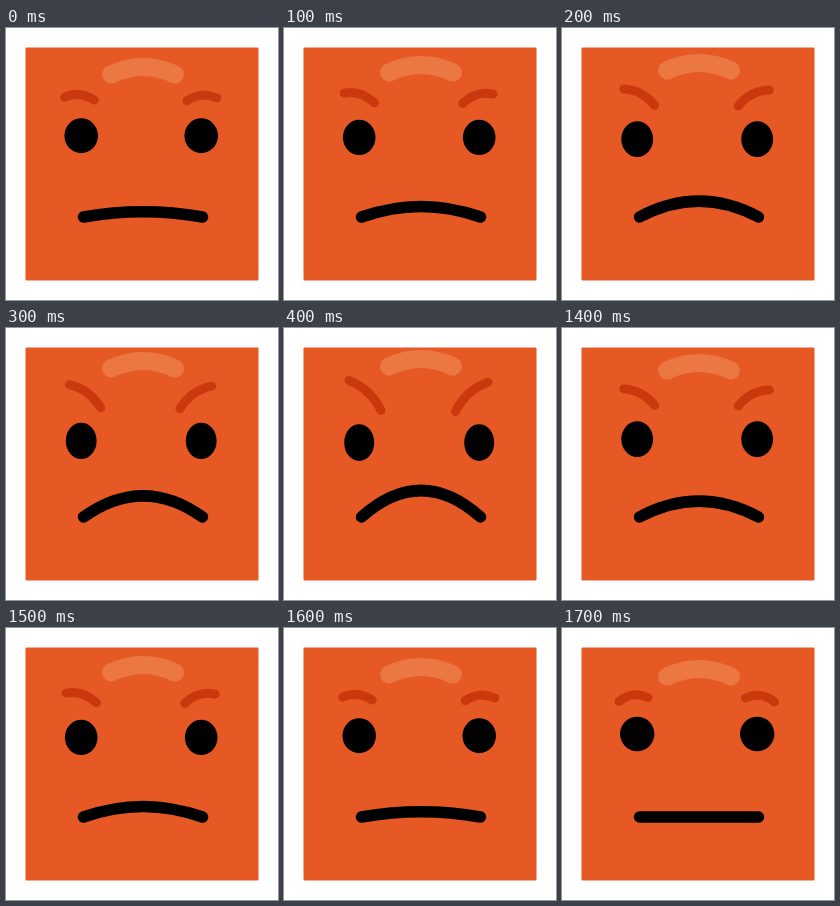
Recreate the animation shown at these times as an HTML page. Size 272x272 px, loop 1900 ms.

```html
<!DOCTYPE html>
<html lang="en">
<head>
<meta charset="utf-8">
<title>Angry square</title>
<style>
  html, body { margin: 0; width: 100%; height: 100%; overflow: hidden; background: #fff; }
  svg { display: block; width: 100vw; height: 100vh; }
  path {
    d: var(--calm);
    fill: none;
    stroke-linecap: round;
    animation: frown 1.9s infinite;
  }
  /* Five hard steps into the frown, a hold, five steps back out. */
  @keyframes frown {
    0% { d: var(--calm); animation-timing-function: steps(5, start); }
    26.31% { d: var(--angry); animation-timing-function: linear; }
    68.42% { d: var(--angry); animation-timing-function: steps(5, start); }
    94.73%, 100% { d: var(--calm); }
  }
  .shine {
    stroke: #eb7743; stroke-width: 18;
    --calm: path("M105 48.5Q137 33.5 169 48.5");
    --angry: path("M105 38.5Q137 23.5 169 38.5");
  }
  .brow { stroke: #c9390d; stroke-width: 9; }
  .brow.left {
    --calm: path("M57 73.5Q70 62.5 86 69.5");
    --angry: path("M65 52.5Q86.5 61 97 82.5");
  }
  .brow.right {
    --calm: path("M212.5 74Q199.5 63 183.5 70");
    --angry: path("M204 54.2Q182 62 171.5 83.5");
  }
  .eye {
    fill: #000;
    --calm: path("M58 106a17.2 17.2 0 1 0 34.4 0a17.2 17.2 0 1 0 -34.4 0z");
    --angry: path("M60.2 114.6a15 18.4 0 1 0 30 0a15 18.4 0 1 0 -30 0z");
  }
  .mouth {
    stroke: #000; stroke-width: 11.5;
    --calm: path("M77.5 189Q137 189 196.5 189");
    --angry: path("M77.5 189Q137 136 196.5 189");
  }
</style>
</head>
<body>
<svg viewBox="0 0 272 272">
  <rect x="19.5" y="19.5" width="233" height="233" rx="1" fill="#e65925"/>
  <path class="shine"/>
  <path class="brow left"/>
  <path class="brow right"/>
  <path class="eye"/>
  <path class="eye" transform="translate(120 0)"/>
  <path class="mouth"/>
</svg>
</body>
</html>
```
